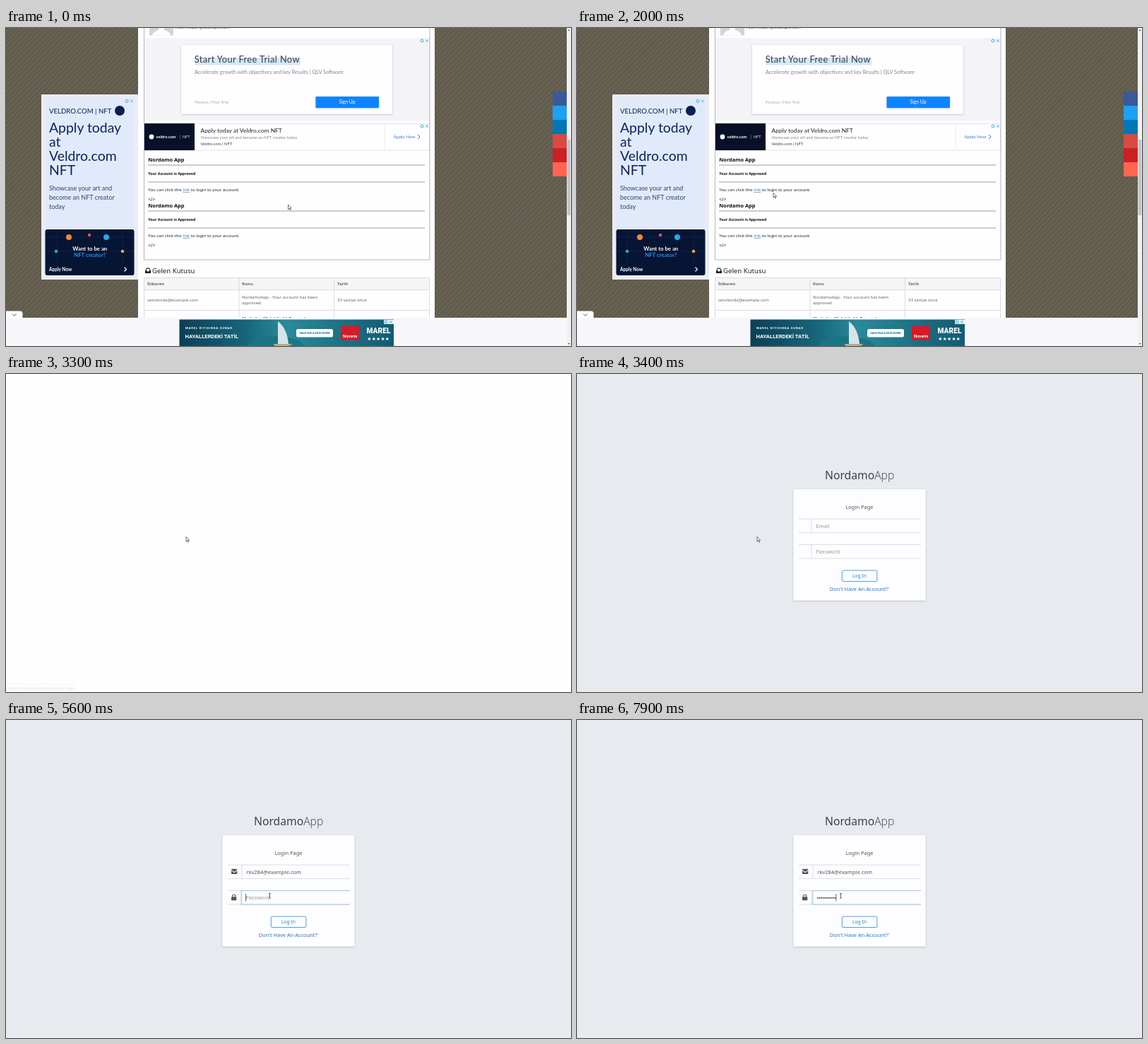
An HTML page for the animation above (8000 ms loop, 800 px wide and 450 px high).

```html
<!DOCTYPE html>
<html lang="en">
<head>
<meta charset="utf-8">
<title>Mail to login</title>
<style>
  html, body { margin: 0; width: 100%; height: 100%; overflow: hidden; background: #fefdff; }
  svg { display: block; width: 800px; height: 450px; font: 6px "Noto Sans", "Open Sans", sans-serif; }
  text { white-space: pre; }
  .ad { font-family: Lato, sans-serif; }
  .banner { font-family: Roboto, sans-serif; font-weight: 700; fill: #fff; }
  .bold { font-weight: 700; }
  .mid { text-anchor: middle; }
  .login { font-size: 7.5px; }
</style>
</head>
<body>
<svg viewBox="0 0 800 450">
  <defs>
    <pattern id="weave" width="5" height="5" patternUnits="userSpaceOnUse" patternTransform="rotate(-45)">
      <rect width="5" height="5" fill="#676252"/>
      <path d="M0 1H5" stroke="#5b5748" stroke-width="1.6"/>
    </pattern>
    <linearGradient id="sea">
      <stop offset="0" stop-color="#0b3f55"/>
      <stop offset=".3" stop-color="#17647a"/>
      <stop offset=".5" stop-color="#2a8a99"/>
      <stop offset="1" stop-color="#125a73"/>
    </linearGradient>
    <filter id="soft" x="-10%" y="-20%" width="120%" height="150%">
      <feDropShadow dx="0" dy=".8" stdDeviation="1" flood-color="#000" flood-opacity=".25"/>
    </filter>
    <g id="choices">
      <circle r="2" fill="none" stroke="#27a5dc" stroke-width=".9"/>
      <path d="M5.2 -1.7l3.4 3.4m0 -3.4l-3.4 3.4" stroke="#27a5dc" stroke-width=".8"/>
    </g>
    <g id="message">
      <text class="bold" x="201.3" y="188.8" font-size="7.4" fill="#111">Nordamo App</text>
      <path d="M201 194H593M201 218H593" stroke="#8d9299" stroke-width=".9"/>
      <text class="bold" x="201.3" y="208.4" font-size="5.25" fill="#111">Your Account is Approved</text>
      <text x="201.3" y="231.2" fill="#222">You can click this <tspan fill="#3b7fb5" text-decoration="underline">link</tspan> to login to your account.</text>
      <text x="201.3" y="244.8" font-size="6.6" fill="#222">&lt;/&gt;</text>
    </g>
  </defs>

  <g id="mail">
    <rect width="800" height="450" fill="url(#weave)"/>
    <rect x="187" width="420" height="450" fill="#fefdff"/>
    <rect x="203" width="34" height="10.5" fill="#d3d2d6"/>
    <path d="M207 10.5q1-6 9-7.5V0h8v3q8 1.500 9 7.500z" fill="#fefdff"/>
    <text x="240" y="1.300" fill="#333">Alıcı: rkv284@example.com</text>

    <g class="ad">
      <rect x="195" y="14" width="405" height="117" fill="#f4f3f7"/>
      <rect x="248" y="24.500" width="299" height="97" fill="#fefdff" filter="url(#soft)"/>
      <rect x="267" y="42" width="150" height="10.500" fill="#d5e8f6"/>
      <text x="266.800" y="49.200" font-size="12.800" letter-spacing=".4" fill="#333b45">Start Your Free Trial Now</text>
      <text x="267" y="65.200" font-size="7.350" fill="#85858a">Accelerate growth with objectives and key Results | QLV Software</text>
      <text x="267" y="106.800" fill="#aaaab0">Plomux | Free Trial</text>
      <rect x="438.500" y="97" width="89.500" height="16" rx="1" fill="#0a84ff" filter="url(#soft)"/>
      <text class="mid" x="483" y="107.400" font-size="6.800" fill="#fff">Sign Up</text>
      <use href="#choices" x="589" y="18"/>

      <rect x="195.500" y="135.500" width="404" height="37.500" fill="#fefdff" stroke="#e2e2e6"/>
      <rect x="195" y="135" width="72" height="38" fill="#081027"/>
      <circle cx="206" cy="154" r="3.400" fill="#fff"/>
      <text class="bold" x="212.500" y="156" font-size="5.700" fill="#fff">veldro.com</text>
      <path d="M246.500 151v6" stroke="#8d93a5" stroke-width=".5"/>
      <text x="250" y="156" font-size="5.400" fill="#e8eaf0">NFT</text>
      <text x="275.500" y="147.800" font-size="8.450" fill="#222">Apply today at Veldro.com NFT</text>
      <text x="275.500" y="157.300" font-size="5.900" fill="#85858a">Showcase your art and become an NFT creator today</text>
      <text x="275.500" y="166.200" font-size="5.900" fill="#444">Veldro.com | NFT</text>
      <path d="M536 136v37" stroke="#ececf0"/>
      <text x="548.500" y="156.300" font-size="6.400" fill="#2b7de9">Apply Now</text>
      <path d="M583 151l3 3-3 3" fill="none" stroke="#2b7de9"/>
      <use href="#choices" x="589" y="139"/>
    </g>

    <path d="M195.500 0V328H600V0" fill="none" stroke="#b5b5bb"/>
    <use href="#message"/>
    <use href="#message" y="65"/>

    <path d="M197 343.500l2-4h4l2 4v3.500h-8z" fill="#222"/>
    <path d="M198.300 343.500l1.200-2.800h3l1.200 2.800h-1.500l-.6 1.200h-1.200l-.6-1.200z" fill="#fefdff"/>
    <text x="207" y="346.600" font-size="9.600" font-weight="500" fill="#222">Gelen Kutusu</text>
    <rect x="195" y="353" width="404" height="17" fill="#f5f4f7"/>
    <path d="M195.500 410V353.500H599.500V410M195 370.500H599M195 399.500H599M330 353V410M464.500 353V410" fill="none" stroke="#dcdce0"/>
    <g fill="#666">
      <g class="bold">
        <text x="200" y="364.200">İtibaren</text>
        <text x="334" y="364.200">Konu</text>
        <text x="469" y="364.200">Tarih</text>
        <text x="334" y="412.600" font-size="5.900" fill="#333">Merhaba, 10 dakikalık E-posta'ya</text>
      </g>
      <text x="200" y="387.200">selvikorda@example.com</text>
      <text x="334" y="382.800">NordamoApp - Your account has been</text>
      <text x="334" y="390.600">approved.</text>
      <text x="469" y="387.200">33 saniye önce</text>
    </g>

    <g class="ad">
      <rect x="50" y="94" width="137" height="262" fill="#ebecf2"/>
      <rect x="55.500" y="99" width="126" height="251" fill="#e0eafb"/>
      <use href="#choices" x="171" y="103.500"/>
      <text x="61" y="120.500" font-size="9.600" fill="#0b1f4d">VELDRO.COM | NFT</text>
      <circle cx="161" cy="117" r="7" fill="#0b1f4d"/>
      <g font-size="19.400" fill="#0b2560">
        <text x="61" y="147.500">Apply today</text>
        <text x="61" y="167.500">at</text>
        <text x="61" y="187.500">Veldro.com</text>
        <text x="61" y="207.500">NFT</text>
      </g>
      <g font-size="9" fill="#33456e">
        <text x="61" y="230">Showcase your art and</text>
        <text x="61" y="243">become an NFT creator</text>
        <text x="61" y="256">today</text>
      </g>
      <rect x="55.500" y="285" width="126" height="65" rx="3" fill="#071535"/>
      <path d="M56 296H181M56 316H92M146 316H181M71 285V334M89 285V306M118 285V306M142 285V306M165 285V334" stroke="#13254f" stroke-width=".7"/>
      <circle cx="89" cy="296" r="4" fill="#f08a35"/>
      <circle cx="118" cy="293" r="2.300" fill="#e0504a"/>
      <circle cx="142" cy="296" r="4" fill="#26a9e0"/>
      <circle cx="71" cy="316" r="2.300" fill="#2fb58a"/>
      <circle cx="165" cy="316" r="2.300" fill="#f0a045"/>
      <g class="bold" fill="#fff">
        <text class="mid" x="118.800" y="315" font-size="7.800">Want to be an</text>
        <text class="mid" x="118.800" y="323.800" font-size="7.800" fill="#2490f0">NFT creator?</text>
        <text x="61" y="343.500" font-size="6.500">Apply Now</text>
      </g>
      <path d="M167.500 338.500l3 3-3 3" fill="none" stroke="#fff" stroke-width="1.100"/>
    </g>

    <rect y="410" width="794" height="40" fill="#f7f6fa"/>
    <path d="M0 411V400.500H20q3.500 0 3.500 3.500V411z" fill="#fefdff"/>
    <path d="M9 404.500l2.800 2.800 2.800-2.800" fill="none" stroke="#444" stroke-width=".9"/>
    <g class="banner">
      <rect x="245.500" y="412.500" width="303.500" height="37.500" fill="url(#sea)"/>
      <path d="M340 450q20-16 48-14 30 4 34 14z" fill="#1b7484"/>
      <path d="M385 415q13 10 15 32h-15z" fill="#d5e5e8"/>
      <path d="M378 447h28l-5 3h-20z" fill="#b9aa8b"/>
      <text x="254" y="426" font-size="4.300" letter-spacing=".75">MAREL KIYISINDA SUNAR</text>
      <text x="253.500" y="439.300" font-size="7.700">HAYALLERDEKİ TATİL</text>
      <rect x="411" y="426" width="52" height="11.500" rx="2.500"/>
      <text class="mid" x="437" y="433.200" font-size="3.600" fill="#1176a5">DAHA FAZLA BİLGİ EDİNİN</text>
      <rect x="474" y="421.500" width="26" height="20" fill="#d71a27"/>
      <text class="mid" x="487" y="437.500" font-size="5">Skyvanta</text>
      <text class="mid" x="527.500" y="432" font-size="10.200" font-weight="900">MAREL</text>
      <text class="mid" x="527.500" y="441.500" font-size="6" letter-spacing="1">★★★★★</text>
      <rect x="535" y="413" width="14" height="6" fill="#e6f3f7"/>
      <use href="#choices" x="538" y="416"/>
    </g>

    <g id="share"></g>
    <rect x="794" width="6" height="450" fill="#f1f1f3"/>
    <rect x="794.700" y="158" width="4.600" height="107" fill="#c3c3c7"/>
    <path d="M795.500 4l1.500-2 1.500 2zM795.500 446l1.500 2 1.500-2z" fill="#555"/>
  </g>

  <g id="login">
    <rect width="800" height="450" fill="#e7eaee"/>
    <text x="351" y="148.600" font-size="15.700" fill="#3a444e">Nordamo<tspan font-weight="300" font-family="Open Sans, Noto Sans, sans-serif">App</tspan></text>
    <rect x="306.500" y="163" width="187" height="157.500" rx="1.500" fill="#fdfcff" filter="url(#soft)"/>
    <g class="login">
      <text class="mid" x="400" y="190.600" fill="#555">Login Page</text>
      <path d="M314 205H487M314 224.500H487M314 241.500H487M314 261H487" stroke="#d8dbe1" stroke-width=".9"/>
      <path id="dividers" d="M332 205v19.500M332 241.500v19.500" stroke="#d8dbe1" stroke-width=".9"/>
      <path id="focus" d="M487 0H333V19.500H487" fill="none" stroke="#96c3e8" stroke-width=".9"/>
      <g id="icons" fill="#555">
        <path d="M319 212q0-1.200 1-1.200h6.300q1 0 1 1.200l-4.150 3zM319 213.200l4.150 3 4.150-3V217q0 1-1 1H320q-1 0-1-1z"/>
        <rect x="319" y="250.300" width="7.300" height="4.900" rx=".8"/>
        <path d="M320.700 250.500V249a2 2 0 0 1 4 0v1.500" fill="none" stroke="#555" stroke-width="1.200"/>
      </g>
      <text id="email" y="217.600"></text>
      <text id="password" y="254.100" fill="#999">Password</text>
      <g id="dots" fill="#3a3a3a"></g>
      <path id="caret" d="M0 0v10.500" stroke="#444" stroke-width=".8"/>
      <rect x="375.300" y="278" width="49.500" height="15.500" rx="1.500" fill="none" stroke="#3f95dd" stroke-width=".9"/>
      <text class="mid" x="400" y="288.200" font-size="6.800" fill="#2a85d3">Log In</text>
      <text class="mid" x="400" y="306.900" font-size="7.400" fill="#1c7dd0">Don't Have An Account?'</text>
    </g>
  </g>

  <g id="status">
    <path d="M0 438.500H98.500V450H0z" fill="#f9f8fb" stroke="#c9c9ce" stroke-width=".8"/>
    <text x="3" y="446.600" font-size="5.250" fill="#666">https://localhost:44342/Account/Login</text>
  </g>
  <path id="arrow" d="M.3 0V6.800L1.900 5.400 2.900 7.700 3.900 7.200 2.900 5H4.900z" fill="#fff" stroke="#333" stroke-width=".7"/>
  <path id="beam" d="M-1.500-3.500Q0-3.500 0-2.800V2.800Q0 3.500-1.500 3.500M1.500-3.500Q0-3.500 0-2.800M0 2.800Q0 3.500 1.500 3.500" fill="none" stroke="#333" stroke-width=".8"/>
</svg>
<script>
  const $ = id => document.getElementById(id);
  const show = (id, on) => $(id).style.display = on ? "" : "none";
  const move = (id, x, y) => $(id).setAttribute("transform", `translate(${x} ${y})`);

  const LOOP = 8000, STEP = 100;
  const BLANK = 3300, LOGIN = 3400, ICONS = 3500;
  const EMAIL_FOCUS = 4300, EMAIL_FILLED = 4800, PASSWORD_FOCUS = 5400;
  const KEY_TIMES = [6000, 6200, 6300, 6500, 6700, 6800, 7000, 7400, 7500, 7700, 7900];
  const DOT_PITCH = 2.5;

  // Pointer stops: time, x, y
  const PATH = [
    [0, 399.2, 250], [400, 399.2, 250], [1300, 256, 225], [1600, 257, 226],
    [1900, 277.7, 233.3], [2300, 277.7, 233.3], [2700, 254.7, 230.3], [3400, 254.7, 230.3],
    [4200, 373, 214.5], [4800, 373, 214.5], [5300, 373.5, 248.7], [LOOP, 373.5, 248.7]
  ];

  $("share").innerHTML = ["#3b5998", "#1da1f2", "#0077b5", "#d94a42", "#cb2027", "#ff6550"]
    .map((color, i) => `<rect x="774" y="${90 + i * 20}" width="20" height="20" fill="${color}"/>`).join("");
  $("dots").innerHTML = KEY_TIMES
    .map((_, i) => `<circle cx="${341 + i * DOT_PITCH}" cy="251.7" r=".95"/>`).join("");

  function pointerAt(t) {
    const i = PATH.findIndex(stop => stop[0] > t);
    const [t0, x0, y0] = PATH[i - 1], [t1, x1, y1] = PATH[i];
    const u = (t - t0) / (t1 - t0), k = u * u * (3 - 2 * u);
    return [x0 + (x1 - x0) * k, y0 + (y1 - y0) * k];
  }

  function statusOpacity(t) {
    if (t >= 1400 && t < 1900) return 1;
    if (t < 2800 || t >= LOGIN) return 0;
    return t < 2900 ? .5 : t < BLANK ? 1 : .18;
  }

  function drawForm(t) {
    const shift = t >= ICONS ? 2 : 0;
    const onPassword = t >= PASSWORD_FOCUS, filled = t >= EMAIL_FILLED;
    const typed = KEY_TIMES.filter(key => key <= t).length;
    show("icons", shift);
    move("dividers", shift, 0);
    show("focus", t >= EMAIL_FOCUS);
    move("focus", 0, onPassword ? 241.5 : 205);
    const email = $("email");
    email.textContent = filled ? "rkv284@example.com" : "Email";
    email.setAttribute("x", 338.3 + shift);
    email.setAttribute("fill", filled ? "#555" : "#999");
    $("password").setAttribute("x", onPassword ? 339.3 : 338.3 + shift);
    show("password", !typed);
    [...$("dots").children].forEach((dot, i) => dot.style.display = i < typed ? "" : "none");
    show("caret", t >= EMAIL_FOCUS);
    if (onPassword) move("caret", 339.5 + typed * DOT_PITCH, 246);
    else move("caret", filled ? 418 : 340, 209.5);
  }

  function draw(t) {
    const [x, y] = pointerAt(t);
    const inField = t >= LOGIN && x > 334 && (Math.abs(y - 214.7) < 10 || Math.abs(y - 251.2) < 10);
    show("mail", t < BLANK);
    show("login", t >= LOGIN);
    $("status").setAttribute("opacity", statusOpacity(t));
    drawForm(t);
    show("arrow", !inField);
    show("beam", inField);
    move(inField ? "beam" : "arrow", x, y);
  }

  const start = performance.now();
  function tick() {
    const t = (performance.now() - start) % LOOP;
    draw(Math.floor(t / STEP) * STEP);
    requestAnimationFrame(tick);
  }
  tick();
</script>
</body>
</html>
```
